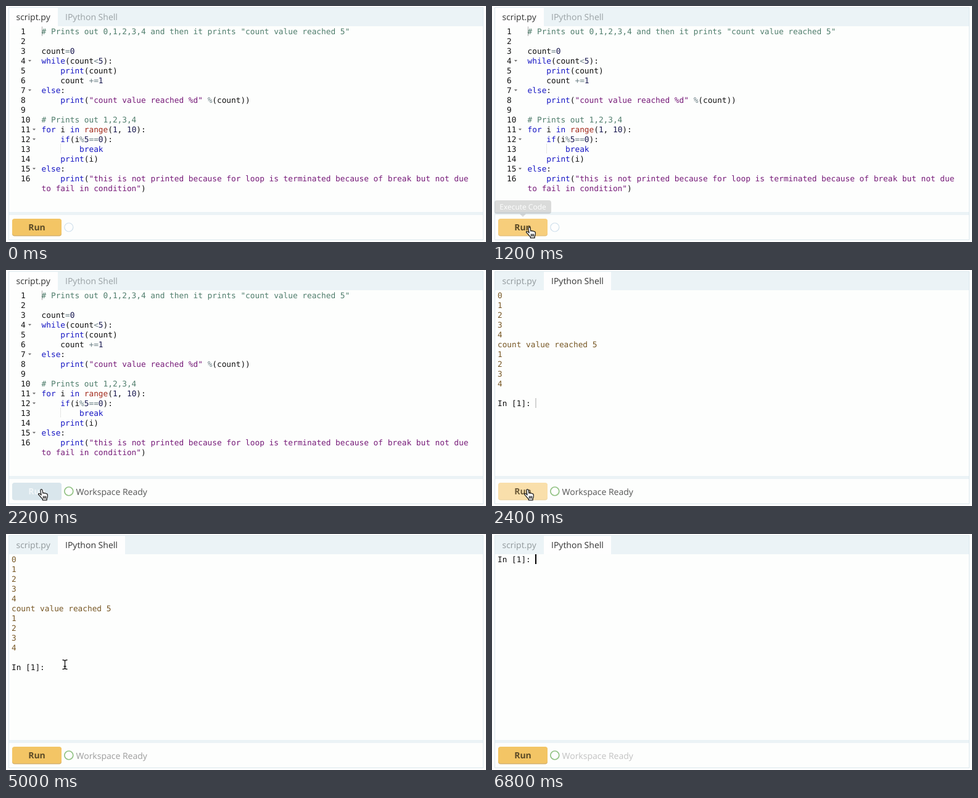
Write an HTML page that moves like this. It is 778 px wide and 385 px high and loops after 7000 ms.

```html
<!DOCTYPE html>
<html lang="en">
<head>
<meta charset="utf-8">
<title>Loop else demo</title>
<style>
html, body { margin: 0; width: 100%; height: 100%; overflow: hidden; background: #fefefe; }
svg { display: block; width: 778px; height: 385px; }
text { white-space: pre; text-rendering: geometricPrecision; font: 14px "Open Sans", sans-serif; }
.mono text { font: 12.77px "DejaVu Sans Mono", Menlo, monospace; fill: #111; }
.com { fill: #4f7d6c; }
.str { fill: #761a78; }
.key { fill: #1616c4; }
.fn { fill: #a32a1c; }
.num { fill: #16164e; }
.op { fill: #6b7f85; }
.mono .out { fill: #775724; }
</style>
</head>
<body>
<svg viewBox="0 0 778 385">
  <rect width="778" height="385" fill="#fefefe"/>
  <rect x="4.5" y="2.5" width="769" height="379" fill="#fdfefd" stroke="#dbe8ed"/>
  <rect x="5" y="3" width="768" height="30" fill="#ebf3f6"/>
  <rect id="tab" y="3" height="30" fill="#fefefe"/>
  <text id="tabA" x="16.5" y="23">script.py</text>
  <text id="tabB" x="96" y="23">IPython Shell</text>
  <rect x="5" y="336" width="768" height="5" fill="#ebf3f6"/>

  <g id="editor" class="mono">
    <path d="M58.5 33.5V49" stroke="#aaa"/>
    <path d="M88.5 225V241" stroke="#ccc" stroke-dasharray="1 1"/>
  </g>
  <g id="shell" class="mono">
    <g id="output"></g>
    <text id="prompt" x="9">In [1]: </text>
    <rect id="caret" x="70" height="16"/>
  </g>

  <rect id="edge" x="10" y="348" width="80" height="27.5" rx="4"/>
  <rect id="button" x="10" y="347" width="80" height="27" rx="4"/>
  <text id="run" x="50" y="366" text-anchor="middle" style="font-weight:700">Run</text>
  <circle id="lamp" cx="101.8" cy="361" r="7" fill="#fefefe"/>
  <text id="status" x="113.5" y="367">Workspace Ready</text>

  <g id="tip">
    <path d="M8 317H92Q96 317 96 321V335Q96 339 92 339H55L50 344L45 339H8Q4 339 4 335V321Q4 317 8 317Z" fill="#555"/>
    <text x="50" y="332" text-anchor="middle" fill="#fff" style="font-size:12px">Execute Code</text>
  </g>

  <g id="pointer" stroke-linejoin="round" stroke-linecap="round">
    <path id="hand" fill="#fff" stroke="#111" stroke-width="1.2"
      d="M-1.6 1.4Q-1.4 -.3 .1 -.2Q1.4 0 1.6 1.5L2.3 6.2Q3.6 4.9 4.8 6.4Q6.2 5.3 7.3 7Q9.6 6.4 9.8 8.8V11.5Q9.6 13.5 8.6 15V17.4H1.8V15.6Q-.6 13.5 -2.2 11.2L-4.6 8.6Q-5.6 7.1 -4.1 6.7Q-2.6 6.6 -.4 9ZM3 11V14.5M5 11V14.5M7 11V14.5"/>
    <path id="arrow" fill="#111" stroke="#fff" d="M0 0V14L3.2 11L5.4 16L7.6 15L5.4 10.2H9.8Z"/>
    <path id="beam" fill="none" stroke="#111" stroke-width="1.3"
      d="M-3.5 -7.5Q0 -7.5 0 -5.5Q0 -7.5 3.5 -7.5M0 -5.5V5.5M-3.5 7.5Q0 7.5 0 5.5Q0 7.5 3.5 7.5M-1.5 3H1.5"/>
  </g>
</svg>
<script>
const $ = id => document.getElementById(id);
const SVG = "http://www.w3.org/2000/svg";
const LOOP = 7000, STEP = 200, LINE = 16, BASE = 46;

const code = `# Prints out 0,1,2,3,4 and then it prints "count value reached 5"

count=0
while(count<5):
    print(count)
    count +=1
else:
    print("count value reached %d" %(count))

# Prints out 1,2,3,4
for i in range(1, 10):
    if(i%5==0):
        break
    print(i)
else:
    print("this is not printed because for loop is terminated because of break but not due
to fail in condition")`.split("\n");

const output = ["0", "1", "2", "3", "4", "count value reached 5", "1", "2", "3", "4"];

const token = /(?<com>#.*)|(?<str>^to fail[^"]*"|"[^"]*(?:"|$))|(?<key>\b(?:while|else|for|in|if|break|print)\b)|(?<fn>\brange\b)|(?<num>\d+)|(?<op>[=<%+]+)/g;

function add(parent, tag, attrs, text = "") {
  const el = document.createElementNS(SVG, tag);
  for (const k in attrs) el.setAttribute(k, attrs[k]);
  el.textContent = text;
  parent.append(el);
  return el;
}

function set(id, attrs) {
  for (const k in attrs) $(id).setAttribute(k, attrs[k]);
}

const show = (id, on) => set(id, { visibility: on ? "visible" : "hidden" });

function codeLine(line, row) {
  const y = BASE + row * LINE;
  const el = add($("editor"), "text", { x: 57.6, y });
  let end = 0;
  for (const m of line.matchAll(token)) {
    const cls = Object.keys(m.groups).find(k => m.groups[k] !== undefined);
    el.append(line.slice(end, m.index));
    add(el, "tspan", { class: cls }, m[0]);
    end = m.index + m[0].length;
  }
  el.append(line.slice(end));

  const n = row + 1;
  if (n > 16) return;
  add($("editor"), "text", { x: 24, y }, String(n));
  if (/^(while|else|for|if)/.test(line.trim())) {
    const x = n < 10 ? 36 : 43;
    add($("editor"), "path", { d: `M${x} ${y - 6}h5l-2.5 3z`, fill: "#777" });
  }
}

code.forEach(codeLine);
output.forEach((s, i) => add($("output"), "text", { x: 9, y: BASE + i * LINE, class: "out" }, s));

const clamp = v => Math.max(0, Math.min(1, v));
const part = (t, a, b) => clamp((t - a) / (b - a));
const smooth = u => u * u * (3 - 2 * u);
const mix = (a, b, u) => a + (b - a) * u;
const grey = v => `rgb(${v},${v},${v})`;

function pointerAt(t) {
  if (t < 1400) {
    const u = 1 - (1 - part(t, 0, 1200)) ** 2;
    return [mix(66, 60.5, u), mix(390, 361, u)];
  }
  if (t <= 2400) {
    const u = smooth(part(t, 1200, 1800));
    return [mix(60.5, 57.5, u), mix(361, 358, u)];
  }
  const u = smooth(part(t, 2400, 3400));
  return [mix(57.5, 95.5, u), mix(358, 213, u)];
}

function buttonLook(t, hover) {
  if (t >= 1600 && t < 2400) return ["#d9e6ec", "#d9e6ec", "#f3f7f9"];
  if (t === 2400) return ["#f9dfab", "#f0d7a4", "#6c5a38"];
  return [hover ? "#f7ce7b" : "#f3c565", hover ? "#e6c17a" : "#d5b16c", "#5b4a26"];
}

function draw(ms) {
  const t = Math.floor((ms % LOOP) / STEP) * STEP;
  const inShell = t >= 2400, cleared = t >= 5400, ready = t >= 1800;

  set("tab", inShell ? { x: 84, width: 109 } : { x: 5, width: 79 });
  set("tabA", { fill: inShell ? "#91999c" : "#333" });
  set("tabB", { fill: inShell ? "#333" : "#9aa2a5" });
  $("editor").style.display = inShell ? "none" : "";
  $("shell").style.display = inShell ? "" : "none";
  $("output").style.display = cleared ? "none" : "";

  const row = cleared ? 0 : 11;
  const focus = t >= 3400;
  set("prompt", { y: BASE + row * LINE });
  set("caret", {
    y: 33 + row * LINE,
    width: focus ? 2 : 1,
    x: focus ? 70 : 70.5,
    fill: focus ? "#000" : "#aaa",
    opacity: !focus || (t - 3400) % 1000 < 600 ? 1 : 0
  });

  const [x, y] = pointerAt(t);
  const overButton = y > 346 && y < 376;
  show("pointer", t >= 200 && !cleared);
  set("pointer", { transform: `translate(${x} ${y})` });
  const shape = y < 336 ? "beam" : overButton ? "hand" : "arrow";
  for (const id of ["hand", "arrow", "beam"]) $(id).style.display = id === shape ? "" : "none";

  const [face, edge, ink] = buttonLook(t, overButton && t >= 200);
  set("button", { fill: face });
  set("edge", { fill: edge });
  set("run", { fill: ink });

  set("tip", { opacity: 0.2 * part(t, 800, 1200) * (1 - part(t, 1200, 1600)) });

  show("status", ready);
  const fade = mix(mix(85, 153, part(t, 2400, 3400)), 194, part(t, 4800, 6800));
  set("status", { fill: grey(Math.round(fade)) });
  set("lamp", { stroke: ready ? "#93c385" : "#cfe0ec", "stroke-width": ready ? 1.7 : 1.2 });
}

const start = performance.now();
function tick() {
  draw(performance.now() - start);
  requestAnimationFrame(tick);
}
draw(0);
requestAnimationFrame(tick);
</script>
</body>
</html>
```
